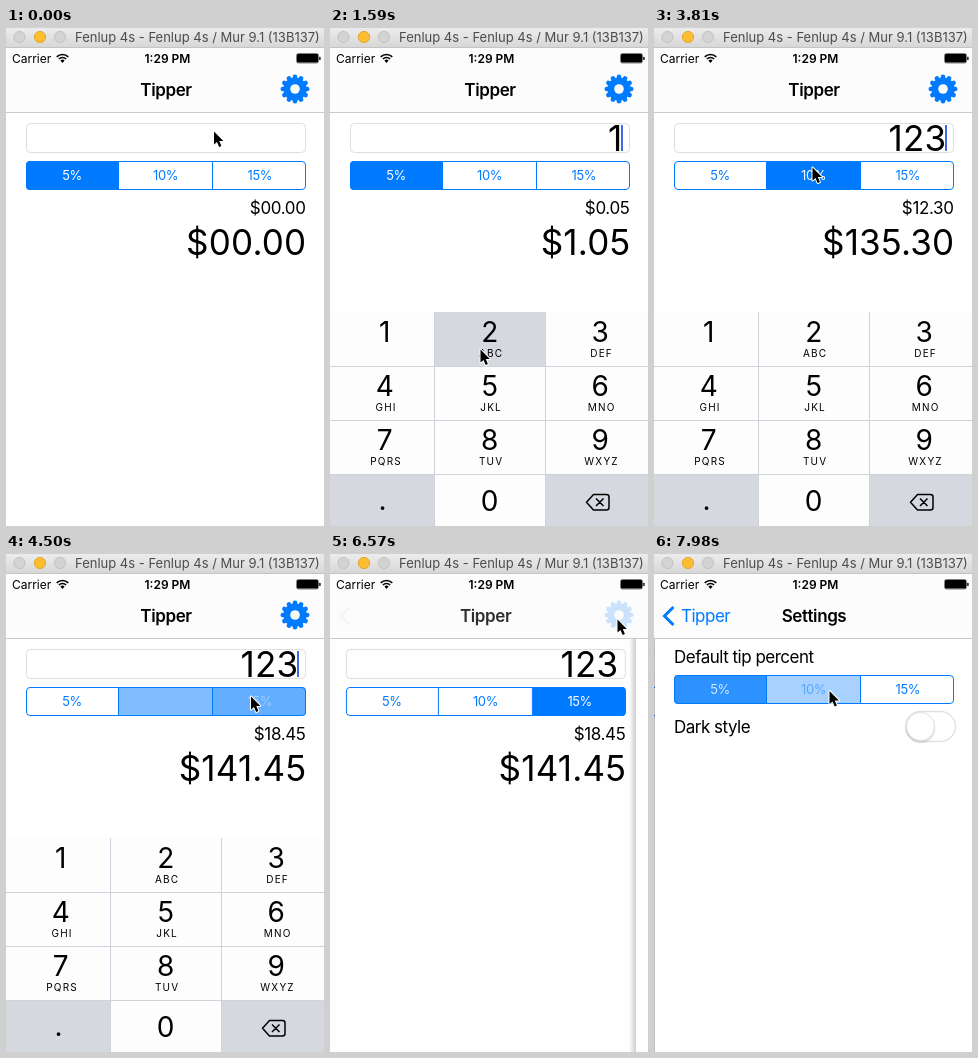
Animation of 318 by 498 pixels, one loop 8 s. Source, as an HTML page:

```html
<!DOCTYPE html>
<html lang="en">
<head>
<meta charset="utf-8">
<title>Tipper</title>
<style>
  html, body { margin: 0; width: 100%; height: 100%; overflow: hidden; background: #fff; }
  svg { display: block; width: 318px; height: 498px; font-family: Inter, Roboto, sans-serif; cursor: default; user-select: none; }
  .body { font-size: 17px; letter-spacing: -.5px; }
  .sum { font-size: 17px; letter-spacing: -.35px; text-anchor: end; }
  .big { font-size: 35px; letter-spacing: .2px; text-anchor: end; }
  .head { font-size: 17px; font-weight: 600; letter-spacing: -.4px; text-anchor: middle; }
  .seg { font-size: 13px; letter-spacing: -.4px; text-anchor: middle; }
  .key { font-size: 28px; text-anchor: middle; }
  .sub { font-size: 10px; letter-spacing: 1.2px; text-anchor: middle; }
</style>
</head>
<body>
<svg id="stage" viewBox="0 0 318 498" xmlns="http://www.w3.org/2000/svg"></svg>
<script>
const LOOP = 8000, W = 318, BLUE = '#007aff', GREY = '#d5d8df';
const COLS = [0, 105, 216, 318], MID = [55.5, 160.5, 271], ROWS = [284, 339, 393, 447, 498];
const LETTERS = ['', 'ABC', 'DEF', 'GHI', 'JKL', 'MNO', 'PQRS', 'TUV', 'WXYZ'];
const SEG_X = [20, 113, 207, 300], SEG_MID = [66, 159.6, 253.8], RATES = [5, 10, 15];

const line = (x1, y1, x2, y2, c) => `<path d="M${x1} ${y1}L${x2} ${y2}" stroke="${c}"/>`;
const box = (x, y, w, h, fill, more = '') =>
  `<rect x="${x}" y="${y}" width="${w}" height="${h}" fill="${fill}" ${more}/>`;
const text = (cls, x, y, s, more = '') => `<text class="${cls}" x="${x}" y="${y}" ${more}>${s}</text>`;

function segments(id, y) {
  const fills = RATES.map((r, i) =>
    box(SEG_X[i], y, SEG_X[i + 1] - SEG_X[i], 29, BLUE, `id="${id}F${i}"`)).join('');
  const labels = RATES.map((r, i) => text('seg', SEG_MID[i], y + 19, r + '%', `id="${id}T${i}"`)).join('');
  return `<clipPath id="${id}C">${box(20, y, 280, 29, '#000', 'rx="4"')}</clipPath>
    <g clip-path="url(#${id}C)">${fills}</g>
    ${box(20.5, y + .5, 279, 28, 'none', `rx="3.5" stroke="${BLUE}"`)}
    ${line(112.5, y, 112.5, y + 29, BLUE)}${line(206.5, y, 206.5, y + 29, BLUE)}${labels}`;
}

function keyboard() {
  let s = box(0, 284, W, 214, '#fdfdfd');
  for (let i = 0; i < 3; i++)
    s += box(COLS[i], 284, COLS[i + 1] - COLS[i], 54, GREY, `id="hit${i + 1}"`);
  s += box(0, 447, 104, 51, GREY) + box(216, 447, 102, 51, GREY);
  for (const y of ROWS.slice(1, 4)) s += line(0, y - .5, W, y - .5, '#cfd2da');
  for (const x of [104.5, 215.5]) s += line(x, 284, x, 498, '#cfd2da');
  LETTERS.forEach((l, i) => {
    const x = MID[i % 3], y = 314 + 54 * Math.floor(i / 3);
    s += text('key', x - .8, y, i + 1) + text('sub', x + .6, y + 14.8, l);
  });
  return s + text('key', 52.5, 482, '.') + text('key', 159.5, 483, 0) +
    `<path d="M263.5 466.5H276.5Q279 466.5 279 469V479.5Q279 482 276.5 482H263.5L256.5 474.2ZM266 470.5L273.5 478M273.5 470.5L266 478"
      fill="none" stroke="#000" stroke-width="1.5" stroke-linejoin="round"/>`;
}

function gear() {
  let teeth = '';
  for (let a = 0; a < 180; a += 30)
    teeth += `<path d="M-12.2 0H12.2" transform="rotate(${a})" stroke="${BLUE}" stroke-width="4.6" stroke-linecap="round"/>`;
  return `<g id="gear" transform="translate(289 61)">${teeth}
    <circle r="11.6" fill="${BLUE}"/><circle r="4.8" fill="#fbfbfb"/></g>`;
}

const lamp = (x, fill, edge) => `<circle cx="${x}" cy="9" r="5.6" fill="${fill}" stroke="${edge}"/>`;
const arc = r => `<path d="M${56.5 - r * .72} ${34.5 - r * .7}A${r} ${r} 0 0 1 ${56.5 + r * .72} ${34.5 - r * .7}"
  fill="none" stroke="#000" stroke-width="1.6"/>`;

document.getElementById('stage').innerHTML = `
  <defs>
    <linearGradient id="bar" x2="0" y2="1"><stop stop-color="#ececec"/><stop offset="1" stop-color="#d6d6d6"/></linearGradient>
    <linearGradient id="shade"><stop stop-color="#000" stop-opacity="0"/><stop offset="1" stop-color="#000" stop-opacity=".2"/></linearGradient>
  </defs>
  ${box(0, 0, W, 498, '#fff')}
  <g id="main">
    ${box(20.5, 95.5, 279, 29, '#fff', 'rx="4" stroke="#dedede"')}
    ${text('big', 292.4, 122.5, '', 'id="bill"')}
    ${box(291, 97, 2, 26, '#4069e8', 'id="caret"')}
    ${segments('tip', 133)}
    ${text('sum', 299.6, 186, '', 'id="tipSum"')}
    ${text('big', 300.4, 227.2, '', 'id="total"')}
  </g>
  <g id="keys">${keyboard()}</g>
  ${box(0, 85, W, 413, '#000', 'id="dim"')}
  <g id="prefs">
    ${box(-6, 85, 7, 413, 'url(#shade)')}${box(1, 85, W, 413, '#fff')}
    ${text('body', 20, 109, 'Default tip percent')}
    ${segments('def', 121)}
    ${text('body', 20, 179, 'Dark style')}
    ${box(251.5, 157.5, 50, 30, '#fff', 'rx="15" stroke="#e2e2e2" stroke-width="1.4"')}
    <circle cx="266.5" cy="174.5" r="14.8" fill="#000" opacity=".1"/>
    <circle cx="266.5" cy="172.5" r="14" fill="#fff" stroke="#d8d8d8" stroke-width=".8"/>
  </g>
  ${box(0, 20, W, 64, '#fcfcfc')}${line(0, 84.5, W, 84.5, '#c9c9c9')}
  ${text('', 6, 34.5, 'Carrier', 'font-size="12"')}
  ${arc(8)}${arc(5)}<path d="M56.5 35L54.4 32.6A3 3 0 0 1 58.6 32.6Z"/>
  ${text('', 161.5, 34.5, '1:29 PM', 'font-size="12" font-weight="600" text-anchor="middle"')}
  ${box(290.5, 25.5, 22, 9.5, 'none', 'rx="2" stroke="#000" stroke-opacity=".5"')}
  ${box(291, 26, 21, 8.5, '#000', 'rx="1"')}${box(313.2, 28.7, 1.4, 3.4, '#000', 'rx=".7"')}
  ${text('head', 160, 68, 'Tipper', 'id="title"')}
  ${text('head', 160, 68, 'Settings', 'id="title2"')}
  ${text('body', 27, 68, 'Tipper', `id="back" fill="${BLUE}"`)}
  <path id="chevron" d="M19.5 53L10.5 62L19.5 71" fill="none" stroke="${BLUE}" stroke-width="3"/>
  ${gear()}
  ${box(0, 0, W, 20, 'url(#bar)')}${line(0, 19.5, W, 19.5, '#c4c4c4')}
  ${lamp(13.5, '#d3d3d3', '#c2c2c2')}${lamp(34, '#fdbd30', '#e3a52b')}${lamp(54, '#d3d3d3', '#c2c2c2')}
  ${text('', 69, 14, 'Fenlup 4s - Fenlup 4s / Mur 9.1 (13B137)', 'font-size="13" fill="#4c4c4c"')}
  <path id="arrow" d="M0 .5V13.6L3 10.9L5.2 16L7.4 15.1L5.3 10H9.4Z" stroke="#fff" stroke-width="2" stroke-linejoin="round" paint-order="stroke"/>`;

const el = {};
document.querySelectorAll('[id]').forEach(n => el[n.id] = n);

const clamp = v => Math.max(0, Math.min(1, v));
const ease = v => v * v * (3 - 2 * v);
// critically damped spring, ms since its start
const spring = ms => { const u = Math.max(0, ms) * .014; return 1 - (1 + u) * Math.exp(-u); };
const show = (n, on) => el[n].setAttribute('opacity', +on);
const move = (n, x, y = 0) => el[n].setAttribute('transform', `translate(${x} ${y})`);

// pointer moves: start, end, x, y
const MOVES = [
  [60, 120, 208, 104], [480, 1130, 45, 321], [1390, 1550, 150.5, 321], [1950, 2280, 255, 321],
  [2830, 3520, 158.5, 139], [3880, 4300, 245, 142], [4730, 5070, 109.5, 221.5],
  [5400, 5990, 245, 92], [6000, 6330, 287.5, 65], [6760, 7340, 224, 111], [7380, 7800, 175.5, 136.5]
];
// key presses: down, up
const TAPS = [[1250, 1370], [1560, 1690], [2290, 2410]];

function pointer(t) {
  let x = 208, y = 103;
  for (const [a, b, nx, ny] of MOVES) {
    const k = ease(clamp((t - a) / (b - a)));
    x += (nx - x) * k;
    y += (ny - y) * k;
  }
  return [x, y];
}

// picks: [segment, press time, release time]
function pick(id, t, picks) {
  const a = [1, 0, 0];
  let old = 0;
  for (const [i, down, up] of picks) {
    if (t < down) break;
    const k = clamp((t - up) / 120);
    a[i] = .2 + .8 * k;
    a[old] = 1 - k;
    old = i;
  }
  a.forEach((v, i) => {
    show(id + 'F' + i, v);
    el[id + 'T' + i].setAttribute('fill', `rgb(${255 * v},${122 + 133 * v},255)`);
  });
}

function draw(t) {
  const bill = '123'.slice(0, TAPS.filter(p => t >= p[1]).length);
  const rate = t < 3690 ? 5 : t < 4440 ? 10 : 15;
  const tip = bill * rate / 100;
  const money = v => '$' + (bill ? v.toFixed(2) : '00.00');
  el.bill.textContent = bill;
  el.tipSum.textContent = money(tip);
  el.total.textContent = money(+bill + tip);

  const last = TAPS.reduce((s, p) => t >= p[1] ? p[1] : s, 410);
  show('caret', t >= 410 && t < 5196 && (t - last) % 1000 < 600);
  TAPS.forEach((p, i) => show('hit' + (i + 1), t >= p[0] && t < p[1]));
  move('keys', 0, 214 * (1 - spring(t - 420) + spring(t - 5196)));

  pick('tip', t, [[1, 3560, 3690], [2, 4330, 4440]]);
  pick('def', t, [[1, 7840, 7960]]);

  const p = t > 7200 ? 1 : spring(t - 6548.5);
  move('main', -.32 * W * p);
  move('prefs', p ? W * (1 - p) : W + 10);
  show('dim', .08 * p);
  move('title', -109 * p);
  show('title', (1 - p) ** 5);
  move('title2', 130 * (1 - p));
  show('title2', p * p);
  move('back', 109 * (1 - p));
  show('back', clamp(1.6 * p - .6));
  show('chevron', p);
  show('gear', (1 - .8 * clamp((t - 6350) / 40)) * (1 - p));
  move('arrow', ...pointer(t));
}

const start = performance.now();
function tick() {
  draw((performance.now() - start) % LOOP);
  requestAnimationFrame(tick);
}
tick();
</script>
</body>
</html>
```
